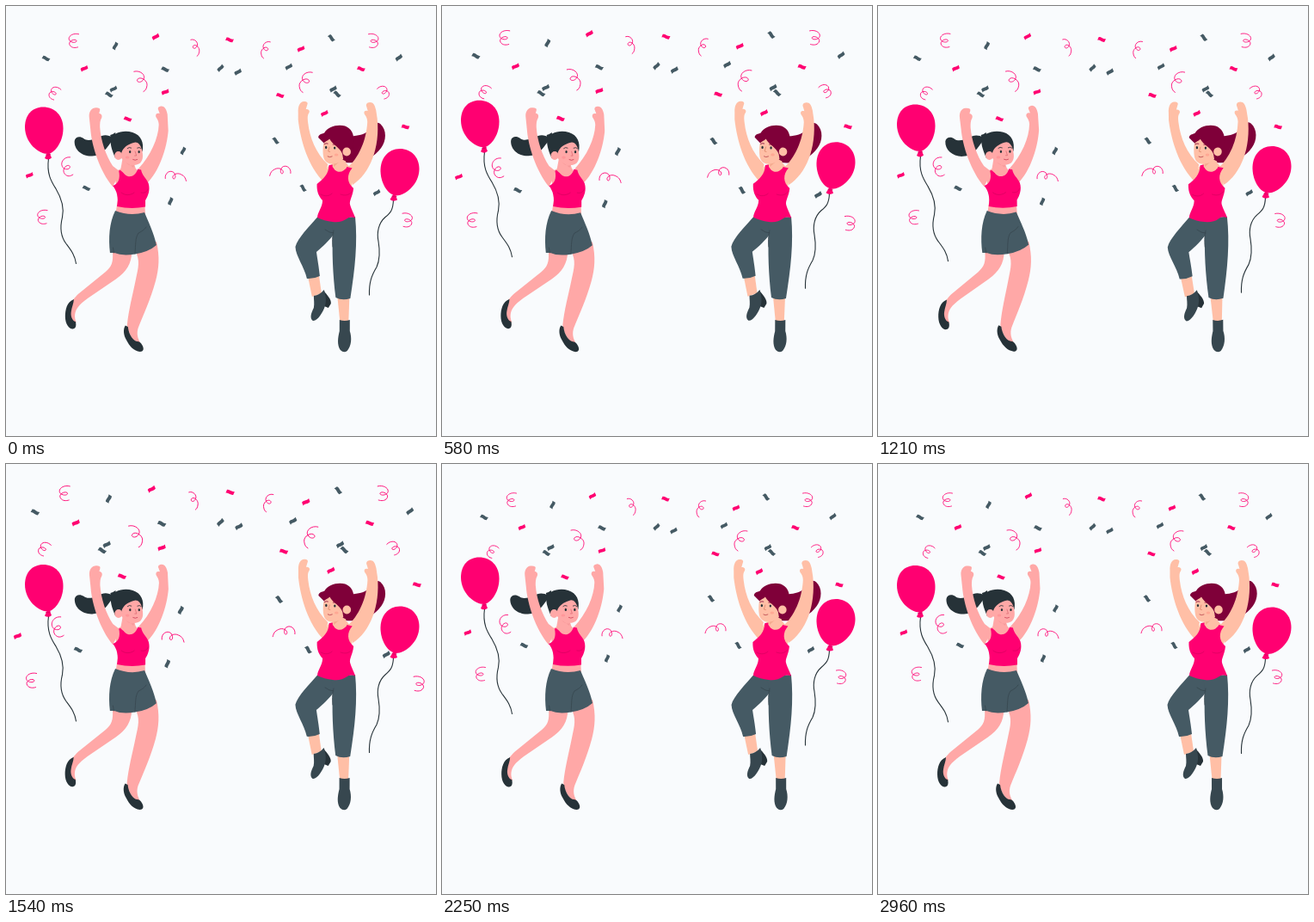
Recreate the animation shown at these times as an HTML page with a canvas. Size 500x500 px, loop 3 s.

```html
<!DOCTYPE html>
<html lang="en">
<head>
<meta charset="utf-8">
<title>Celebration</title>
<style>
html, body { margin: 0; width: 100%; height: 100%; overflow: hidden; background: #f9fbfd; }
canvas { display: block; width: 100vw; height: 100vh; }
</style>
</head>
<body>
<canvas id="stage"></canvas>
<script>
const canvas = document.getElementById('stage');
const ctx = canvas.getContext('2d');
const LOOP = 3000, LEAD = 35;
const PINK = '#ff0071', DARK = '#455a64', INK = '#263238', LINE = '#37474f', DEEP = '#d6005f';
const ROSE = '#ffa8a7', PEACH = '#ffbfa6', WINE = '#7f0039';

const fill = (color, d) => ({ color, path: new Path2D(d) });
const line = (color, width, d) => ({ color, width, path: new Path2D(d) });
const dot = (color, x, y, rx, ry) =>
  fill(color, `M${x - rx} ${y}a${rx} ${ry} 0 1 0 ${2 * rx} 0a${rx} ${ry} 0 1 0 ${-2 * rx} 0Z`);

const leftGirl = [
  // ponytail
  fill(INK, 'M124 153C118 149 111 150 108 153C101 155 95 158 90 154C86 151 80 152 79.5 157C79 167 88 175 100 174.5C112 174 117 165 123 157Z'),
  fill(INK, 'M121 150L124 149L127 147L128 155L122 155Z'),
  // arms
  fill(ROSE, 'M96.5 129C96 123 99 119 103 118.5C107 118 109.5 119 109 121L108 125C110.5 125 112 127.500 111 130C109 133 109 137 109 141C110 156 116 174 124 186L133 193L124 210C109 192 99.500 163 98 143Z'),
  fill(ROSE, 'M187.500 126C186.500 120 184 116 180 116.500C176.500 117 176 119 177 121L178.500 125C175 124 173.500 126 174 128.500C175 131 177.500 133 177.500 138C177 154 168 174 154 189L163 207C178 193 187 165 188.500 145Z'),
  // legs
  fill(ROSE, 'M124 285C125 298 123 303 116 309L84 335C79 340 77 343 77 345L72 353L77 368L82 368C79 362 80 355 84 350C86 347 90 344 95 340L128 317.500C140 309 146 300 146.500 285Z'),
  fill(INK, 'M79 341C71 344 69 353 69 361C69 370 74 376 78 375.500C82 375 82 370 81 367C77 366 75 360 76 355C76.500 350 79 346 79 341Z'),
  fill(ROSE, 'M150 284C156.500 296 154 304 151 318C147 338 143 352 141 371C143 383 149 392 156 391C153 386 152 380 154 374C160 359 168 342 174 320C178 305 179 292 175 274Z'),
  fill(INK, 'M139 371.500C136 376 137 383 140 388C144 396 149 401 156 402C160 402 161 399 159 395C157 391 155 390 153 390C149 390 143 383 142 373Z'),
  // torso and clothes
  fill(ROSE, 'M126 193L134 189L151 189L160 203L162 244L127 244L130 225Z'),
  fill(PINK, 'M131 191.500L135 190.500C138 201 150 201 153 189.500L157 190.500C158 197 163 200 165.500 206C168 214 165 221 162 226L162 233.500Q145 236.500 129 233C131 223 129 215 124 209C131 207 133 200 131 191.500Z'),
  line(DEEP, 0.7, 'M157 217C161 218 164 216 165 213M134 217C139 221 145 220 149 217'),
  fill(DARK, 'M127 238Q144 245 161 240C166 252 172 264 175 278Q166 286 150 288.500Q135 291 126 287L121 287C119 270 120 252 127 238Z'),
  line(LINE, 0.8, 'M150 288C151 277 150 270 154 264C158 262 161 260 163 257M125.500 287L124.500 281'),
  // head
  fill(ROSE, 'M136 174L133 191Q141 200 151 190L148 181Z'),
  fill('#f79a9b', 'M139 181Q143 187 149 185L148 188Z'),
  fill(INK, 'M121.500 156C123 148 136 143.500 147 147C157 150 160.500 159 158.500 169L134 176L127 177C124 170 121 162 121.500 156Z'),
  fill(ROSE, 'M134 177L134 171C136 164 142 161 148 159C152 157 156 160 158 167C159 173 160 178 156 182.500C150 187 141 185 134 177Z'),
  dot(ROSE, 130.5, 174, 4.5, 4.9),
  dot('#ff979a', 141, 176, 2.3, 1.6),
  dot(INK, 144, 169.5, 1.2, 1.6),
  dot(INK, 154.5, 169.5, 1.2, 1.6),
  line(INK, 0.8, 'M141 165.500Q143 163.500 145.500 165M152.500 165Q155 163.500 157 165.500'),
  line('#d9656f', 0.7, 'M150 169L151.500 174L149.500 174'),
  line('#c93d55', 0.8, 'M147.500 178.500Q150 180 152.500 178.500')
];

const rightGirl = [
  fill(WINE, 'M396 153C405 150 412 152 420 146C424 138 430 133.500 435 137C443 144 442 157 436 165C428 176 415 184 394 182Z'),
  fill(PEACH, 'M339.500 124C339 116 342 111 346 111C350.500 111 351 113 350 115L348.500 120C352 120 353.500 122 352 124.500C350 127 350.500 131 351 136C353 153 360 171 374 184L370 205C351 187 342 155 339.500 132Z'),
  fill(PEACH, 'M430 121C428.500 115 427 112 423 112C419 112 418 115 419 117L420.500 122C417 121 415.500 123 416.500 125.500C418 128 420 130 420 135C419 156 410 177 396 189L403 208C423 195 435 165 431.500 131Z'),
  // ankles and boots
  fill(PEACH, 'M351 314L364 313L367 334L356 338Z'),
  fill(PEACH, 'M385.500 338L399.500 338L398.500 367L388.500 367Z'),
  fill(INK, 'M369 331C373 335 378.500 341 378 346L375 351L370 349Z'),
  fill(LINE, 'M358 337Q365 336 370 330C372 337 373 343 371 349C369 356 362 367 357 366C353 363 355 357 358 351C359 346 358 341 358 337Z'),
  fill(LINE, 'M388 365Q394 367 400 365L400 378C402.500 386 402 395 397 401Q393 404 389 400C385 394 386 386 388 378Z'),
  // trousers
  fill(DARK, 'M362.500 245C353 256 339 270 336.500 280C337 291 347 303 350 317Q358 317.500 365 314C364 304 362 293 361 286C368 280 376 273 383 263L390 246Z'),
  fill(DARK, 'M378 247L406 245C409 275 406 305 400.500 340Q391 343 383.500 339C380 312 379 285 380 262Z'),
  line(LINE, 0.8, 'M380 280C379 271 380 266 381 261M381 264Q376 264 371 260'),
  // torso
  fill(PEACH, 'M374 187L381 182L396 183L403 192L402 212L364 212Z'),
  fill(PINK, 'M375.500 185L380 184.500C380 194 392 196 396 187L402.500 188.500C396 196 396 205 404 212C403 222 399 226 400 231C402 238 405 242 406 246.500Q400 244 396 247.500Q390 252 380 251Q370 250 362 246C362 240 368 234 368 226C364 222 361 216 361.500 207C369 201 375 196 375.500 185Z'),
  line(DEEP, 0.7, 'M366 219C371 222 376 221 379 218M389 219C394 221 399 220 402 216'),
  fill(PEACH, 'M380 176L379.500 187Q387 196 396 188L394 172Z'),
  fill('#f4ab8f', 'M381 183Q387 183 391 178L381 187Z'),
  // head
  fill(WINE, 'M363 153C363 149 367 149 370 147.500C374 140 386 137 394 139.500C401 142 405 149 404 158C403 168 402 176 396 181L390 178L370 160Z'),
  fill(PEACH, 'M369 160C371 157 374 157 376 154.500C380 162 388 164 391 172L392 178C386 184 376 186 371 180C368 176 368 167 369 160Z'),
  dot(PEACH, 396, 169.5, 4.8, 5),
  dot('#ffa894', 384, 173, 2.3, 1.6),
  dot(INK, 372, 164.5, 1.2, 1.6),
  dot(INK, 382, 165, 1.2, 1.6),
  line(WINE, 0.8, 'M370 160.500Q372 159 374 160M380 161Q383 160 385 162'),
  line('#d97f62', 0.7, 'M376 164L374.500 169L376.500 169.500'),
  line('#b5404a', 0.8, 'M374 175Q376 176.500 379 175')
];

const leftBalloon = [
  line(INK, 1.1, 'M49.500 178C47 196 53 205 58 213C64 223 68 234 65.500 246C62 260 64 269 70 277C76 285 80 290 81.500 300'),
  fill(PINK, 'M22 141C22 127 31 118 43 118C57 118 66.500 128 66.500 143C66.500 160 55 172.500 48.500 172.500C38 172.500 22 160 22 141Z'),
  fill(PINK, 'M48 171L45 177.500Q49 180.500 53 177L50.500 171Z'),
  line(DEEP, 0.8, 'M46.500 173.500Q49 174.500 51.500 173')
];

const rightBalloon = [
  line(INK, 1.1, 'M450.500 226C450 238 447 241 441 246C433 253 431 264 433 274C435 286 435 295 431 304C425 314 422 322 422.500 336.500'),
  fill(PINK, 'M435.500 193C435 178 444 166.500 458 166.500C471 166.500 480.500 176 480.500 190C480.500 208 464 221 453.500 221C444 220 436 207 435.500 193Z'),
  fill(PINK, 'M450.500 219L446.500 225.500Q450.500 228.500 455 226L453 220Z'),
  line(DEEP, 0.8, 'M449 221.500Q451.500 223 454 222')
];

// x, y, angle in degrees
const pinkBits = [
  [93, 73.5, -22], [175, 37, -28], [260, 40.5, 22], [342, 51, -22], [411, 74, 22], [186, 100.5, -18],
  [143, 131.5, 24], [30, 196, -20], [318, 104.5, 20], [369, 125, -25], [462, 140.5, 18]
];
const darkBits = [
  [49, 62, 30], [128.5, 47.5, -60], [186, 74.5, 28], [249.5, 73, -42], [269.5, 77.5, -28], [328, 71.5, -28],
  [377, 38.5, 55], [454.5, 61, -35], [126.5, 97, -25], [121.5, 103.5, 35], [379, 97, -28], [383.5, 103, 45],
  [206.5, 168, -60], [192, 226, -65], [95.5, 211, 28], [313, 156.5, 55], [344.5, 211, 60], [429, 216, -30]
];
const bit = new Path2D('M-4.300 -1.200C-2 -3 1 -.6 4.200 -2.400L4 1.500C1 3 -2 .8 -4.300 2.600Z');

const CURL = 'M5 -8C-3 -10 -9 -4 -5 0C-1 3 4 1 2 -1C-1 -3 -8 1 -5 5C-3 8 1 8 4 7';
const HOOK = 'M-8 -11C-1 -13 6 -7 3 -2C0 3 -6 1 -4 -2C-1 -6 8 -1 7 5C6.500 9 5 11 3 12';
const WAVE = 'M-12 3C-13 -4 -6 -8 -2 -4C1 0 -1 5 -3 3C-5 0 0 -5 6 -2C10 0 11 2 12 6';

// bakes the transform into the path so that every stroke keeps one width
function swirl(d, x, y, sx = 1, sy = 1, angle = 0) {
  const path = new Path2D();
  path.addPath(new Path2D(d), new DOMMatrix().translate(x, y).rotate(angle).scale(sx, sy));
  return { color: PINK, width: 0.85, path };
}
const swirls = [
  swirl(CURL, 81.5, 42), swirl(CURL, 58.5, 102, 0.85, 0.95, 32), swirl(CURL, 74, 187, 1, 1.35, -12),
  swirl(CURL, 45.5, 244.5), swirl(HOOK, 158, 88), swirl(HOOK, 220.5, 49.5, 0.65, 0.82),
  swirl(HOOK, 301, 52, -0.7, 0.82), swirl(HOOK, 347, 89, -1), swirl(CURL, 424.5, 42, -1),
  swirl(CURL, 437, 101, -0.85, 0.95, -32), swirl(CURL, 463.5, 248, -1),
  swirl(WAVE, 318, 191, -1, 0.95), swirl(WAVE, 198, 197, 1, 0.95)
];

const rad = deg => deg * Math.PI / 180;

// straight interpolation between [time, value] stops
function track(stops, t) {
  let i = 1;
  while (i < stops.length - 1 && t > stops[i][0]) i++;
  const [t0, a] = stops[i - 1], [t1, b] = stops[i];
  return a + (b - a) * (t - t0) / (t1 - t0);
}
const BEAT = [[0, 1], [0.1, 1.1], [0.3, 1], [0.4, 1], [0.5, 1.1], [0.6, 1], [1, 1]];
const SWAY = [[0, 0], [0.25, 1], [0.75, -1], [1, 0]];
const FLOAT = [[0, 0], [0.5, -10], [1, 0]];

function paint(parts) {
  for (const { color, path, width } of parts) {
    if (width) {
      ctx.strokeStyle = color;
      ctx.lineWidth = width;
      ctx.stroke(path);
    } else {
      ctx.fillStyle = color;
      ctx.fill(path);
    }
  }
}

function group(draw) {
  ctx.save();
  draw();
  ctx.restore();
}

function drawBits(list, color) {
  ctx.fillStyle = color;
  for (const [x, y, a] of list) group(() => {
    ctx.translate(x, y);
    ctx.rotate(rad(a));
    ctx.fill(bit);
  });
}

function drawConfetti(scale) {
  group(() => {
    ctx.translate(250, 143);
    ctx.scale(scale, scale);
    ctx.translate(-250, -143);
    paint(swirls);
    drawBits(darkBits, DARK);
    drawBits(pinkBits, PINK);
  });
}

function drawGirl(parts, cx, cy, angle) {
  group(() => {
    ctx.translate(cx, cy);
    ctx.rotate(rad(angle));
    ctx.translate(-cx, -cy);
    paint(parts);
  });
}

function render(ms) {
  const w = Math.round(innerWidth * devicePixelRatio), h = Math.round(innerHeight * devicePixelRatio);
  if (canvas.width !== w || canvas.height !== h) {
    canvas.width = w;
    canvas.height = h;
  }
  ctx.setTransform(w / 500, 0, 0, h / 500, 0, 0);
  ctx.fillStyle = '#f9fbfd';
  ctx.fillRect(0, 0, 500, 500);
  ctx.lineCap = ctx.lineJoin = 'round';

  const p = ((ms + LEAD) % LOOP) / LOOP;
  const half = (p * 2) % 1;
  const angle = track(SWAY, half);

  drawConfetti(track(BEAT, p));
  group(() => {
    ctx.translate(0, track(FLOAT, half));
    paint(leftBalloon);
    paint(rightBalloon);
  });
  drawGirl(leftGirl, 129, 259, angle);
  drawGirl(rightGirl, 389, 257, angle);
}

const start = performance.now();
function tick() {
  render(performance.now() - start);
  requestAnimationFrame(tick);
}
tick();
</script>
</body>
</html>
```
